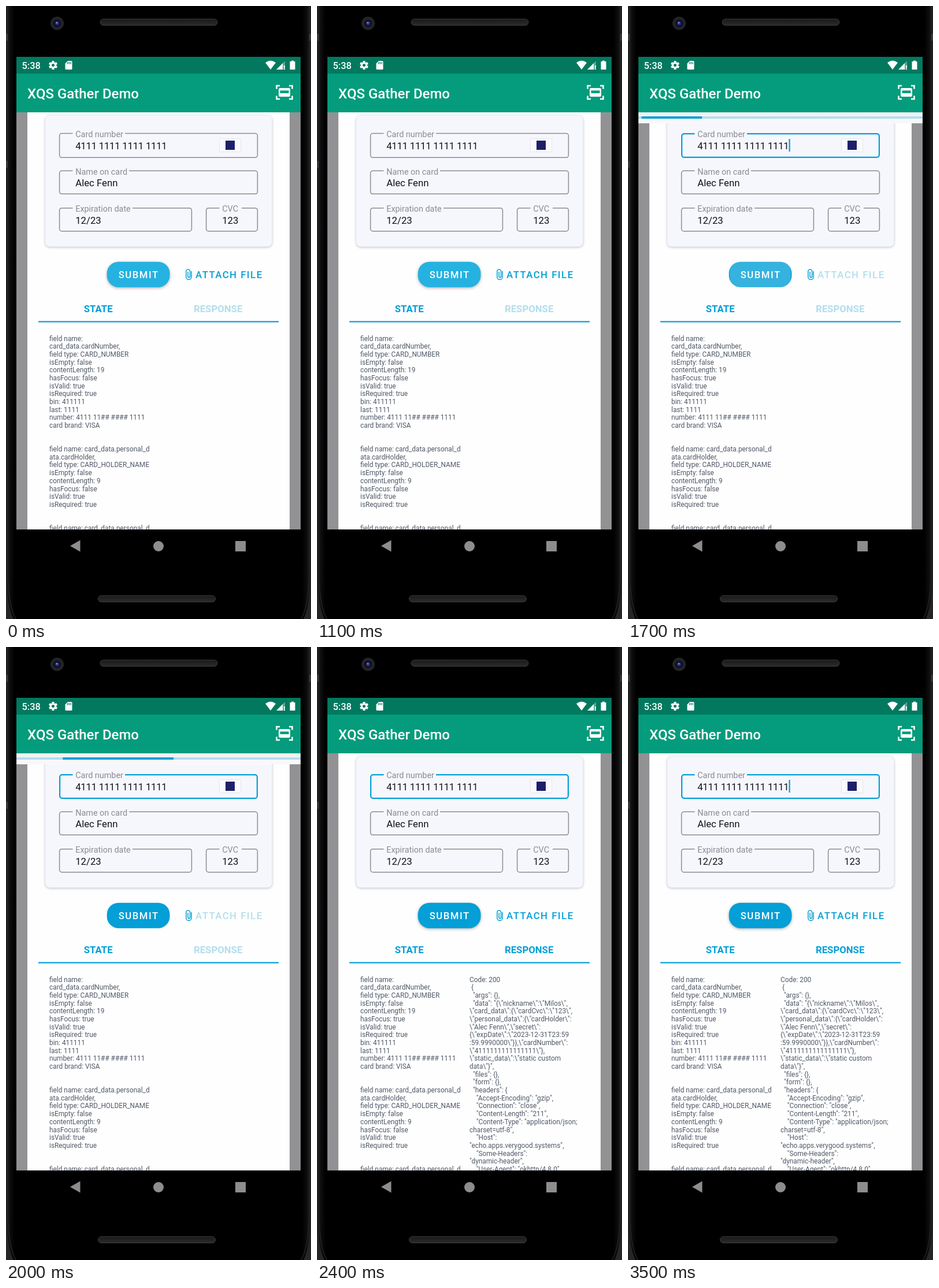
Recreate the animation shown at these times as an HTML page with a canvas. Size 528 by 1061 pixels, loop 3700 ms.

```html
<!DOCTYPE html>
<html lang="en">
<head>
<meta charset="utf-8">
<title>Card form demo</title>
<style>
html, body { margin: 0; width: 100%; height: 100%; overflow: hidden; background: #000; }
canvas { display: block; }
</style>
</head>
<body>
<canvas id="stage" width="528" height="1061"></canvas>
<script>
const ctx = document.getElementById('stage').getContext('2d');
const LOOP = 3700, PRESS = 1400, SEND = 1500, REPLY = 2300;
const BLUE = '#039fd6', PALE = '#b3deec', INK = '#505867';

const STATE = [
  'field name:', 'card_data.cardNumber,', 'field type: CARD_NUMBER', 'isEmpty: false',
  'contentLength: 19', 'hasFocus: false', 'isValid: true', 'isRequired: true',
  'bin: 411111', 'last: 1111', 'number: 4111 11## #### 1111', 'card brand: VISA', '', '',
  'field name: card_data.personal_d', 'ata.cardHolder,', 'field type: CARD_HOLDER_NAME',
  'isEmpty: false', 'contentLength: 9', 'hasFocus: false', 'isValid: true', 'isRequired: true',
  '', '', 'field name: card_data.personal_d'
];
const RESPONSE = String.raw`Code: 200
 {
  "args": {},
  "data": "{\"nickname\":\"Milos\",
\"card_data\":{\"cardCvc\":\"123\",
\"personal_data\":{\"cardHolder\":
\"Alec Fenn\",\"secret\":
{\"expDate\":\"2023-12-31T23:59
:59.9990000\"}},\"cardNumber\":
\"4111111111111111\"},
\"static_data\":\"static custom
data\"}",
  "files": {},
  "form": {},
  "headers": {
    "Accept-Encoding": "gzip",
    "Connection": "close",
    "Content-Length": "211",
    "Content-Type": "application/json;
charset=utf-8",
    "Host":
"echo.apps.verygood.systems",
    "Some-Headers":
"dynamic-header",
    "User-Agent": "okhttp/4.8.0"`.split('\n');

function rect(x, y, w, h, color) {
  ctx.fillStyle = color;
  ctx.fillRect(x, y, w, h);
}

function round(x, y, w, h, r, fill, stroke, width = 1) {
  ctx.beginPath();
  ctx.roundRect(x, y, w, h, r);
  paint(fill, stroke, width);
}

function circle(x, y, r, fill, stroke, width = 1) {
  ctx.beginPath();
  ctx.arc(x, y, r, 0, Math.PI * 2);
  paint(fill, stroke, width);
}

function shape(path, fill, stroke, width = 1) {
  const p = new Path2D(path);
  if (fill) { ctx.fillStyle = fill; ctx.fill(p); }
  if (stroke) { ctx.strokeStyle = stroke; ctx.lineWidth = width; ctx.stroke(p); }
}

function paint(fill, stroke, width) {
  if (fill) { ctx.fillStyle = fill; ctx.fill(); }
  if (stroke) { ctx.strokeStyle = stroke; ctx.lineWidth = width; ctx.stroke(); }
}

function text(str, x, y, size, color, weight = 400, spacing = 0) {
  ctx.font = `${weight} ${size}px Roboto, sans-serif`;
  ctx.letterSpacing = spacing + 'px';
  ctx.fillStyle = color;
  ctx.fillText(str, x, y);
}

function gradient(x0, y0, x1, y1, ...colors) {
  const g = ctx.createLinearGradient(x0, y0, x1, y1);
  colors.forEach((c, i) => g.addColorStop(i / (colors.length - 1), c));
  return g;
}

function withShadow(color, blur, dy, draw) {
  ctx.save();
  ctx.shadowColor = color;
  ctx.shadowBlur = blur;
  ctx.shadowOffsetY = dy;
  draw();
  ctx.restore();
}

function clipped(x, y, w, h, r, draw) {
  ctx.save();
  ctx.beginPath();
  ctx.roundRect(x, y, w, h, r);
  ctx.clip();
  draw();
  ctx.restore();
}

function speaker(x, y) {
  round(x, y, 203, 11, 5.5, gradient(0, y, 0, y + 11, '#1a1a1b', '#2b2b2c'), '#3a3a3b');
}

function phone() {
  rect(0, 0, 528, 1061, '#000');
  rect(0, 0, 15, 1061, gradient(0, 0, 15, 0, '#222223', '#0c0c0d', '#000'));
  rect(513, 0, 15, 1061, gradient(513, 0, 528, 0, '#000', '#0c0c0d', '#222223'));
  shape('M3 0V980Q4 1038 17 1061M525 0V980Q524 1038 511 1061', null, '#242425', 1.5);
  shape('M0 985Q2 1040 13 1061H0ZM528 985Q526 1040 515 1061H528Z', '#262628');
  rect(0, 48, 3, 12, '#39393a');
  rect(0, 268, 3, 12, '#39393a');
  rect(525, 48, 3, 12, '#39393a');
  speaker(163, 22.5);
  speaker(159.5, 1020.5);
  circle(88.5, 30, 11, '#232325', '#2c2c2f');
  circle(88.5, 30, 6.5, '#0e0f24');
  circle(88.5, 30, 3.5, '#252b80');
  circle(88, 29, 1.6, '#7d84cf');
  shape('M111 934.5L128.5 924.5V944.5Z', '#8e8c8f');
  circle(264, 935, 9, '#8e8c8f');
  rect(397, 926, 18, 18, '#8e8c8f');
}

function statusIcons() {
  for (let i = 0; i < 6; i++) {
    ctx.save();
    ctx.translate(81.5, 102.5);
    ctx.rotate(i * Math.PI / 3);
    rect(-2, -7.5, 4, 4, '#fff');
    ctx.restore();
  }
  circle(81.5, 102.5, 4.1, null, '#fff', 3.2);
  shape('M107 95H113Q114.5 95 114.5 96.5V108.5Q114.5 110 113 110H104Q102.5 110 102.5 108.5V99.5Z', '#fff');
  for (const x of [106, 108.7, 111.4]) rect(x, 97, 1.3, 3.5, '#02795f');
  shape('M449 98Q458 91 467 98L458 110Z', '#fff');
  shape('M483 95V110H468Z', 'rgba(255,255,255,.35)');
  shape('M479 99V110H468ZM481 103H483V107H481ZM481 108H483V110H481Z', '#fff');
  shape('M494 94.5H498V96H500.5V110H491.5V96H494Z', '#fff');
}

function header() {
  rect(18, 88, 492, 29, '#02795f');
  rect(18, 117, 492, 67, '#049c7c');
  text('5:38', 27.5, 108.7, 16.4, '#fff', 500);
  statusIcons();
  text('XQS Gather Demo', 37, 159.5, 24, '#fff', 500);
  shape('M474 138H468.5V143.5M490 138H495.5V143.5M474 161H468.5V155.5M490 161H495.5V155.5', null, '#fff', 2.6);
  round(472, 142, 20, 15, 2.5, '#fff');
  rect(474.5, 146.3, 15, 4.6, '#049c7c');
}

function field(x, y, w, h, notch, label, value, { focused = false, spacing = 0 } = {}) {
  const [left, right] = notch, labelX = left + 4.7;
  const inset = focused ? .5 : 0;
  ctx.save();
  ctx.beginPath();
  ctx.rect(0, y + 4, 528, h + 8);
  ctx.rect(0, y - 6, left, 10);
  ctx.rect(right, y - 6, 528 - right, 10);
  ctx.clip();
  round(x + inset, y + inset, w - 2 * inset, h - 2 * inset, 4, null,
    focused ? BLUE : '#8b8b8f', focused ? 2.2 : 1.5);
  ctx.restore();
  text(label, labelX, y + 6.3, 14.4, '#8b8b91');
  text(value, labelX, y + 26.9, 16.76, '#111114', 400, spacing);
}

function card(focused, cursor) {
  withShadow('rgba(70,80,110,.38)', 4, 1, () => round(68, 189.5, 392.5, 227, 8, '#f6f7fd'));
  field(92.6, 220.6, 342.8, 41.7, [115.5, 206], 'Card number', '4111 1111 1111 1111', { focused, spacing: -.25 });
  field(92.6, 285.3, 342.8, 40, [115.5, 213], 'Name on card', 'Alec Fenn');
  field(92.6, 349.7, 228.8, 40, [115.5, 219], 'Expiration date', '12/23');
  field(346.6, 349.7, 88.8, 40, [369.5, 408], 'CVC', '123');
  round(369.5, 229.5, 37, 23, 1, '#fafafe', '#e5e6eb');
  rect(380, 233, 16, 16, '#1d2069');
  if (cursor) rect(278.5, 230, 2.2, 22, BLUE);
}

function submitButton(t) {
  const box = [174.7, 442.7, 108.8, 44, 20];
  const body = () => round(...box, t < SEND ? '#25b2e0' : BLUE);
  if (t >= SEND && t < REPLY) body();
  else withShadow('rgba(0,0,0,.3)', 5, 1.5, body);
  if (t >= PRESS && t < 1900) {
    const radius = t < SEND ? 34 : 53;
    const alpha = t < SEND ? .25 : .4 * (1900 - t) / 400;
    clipped(...box, () => circle(229, 465, radius, `rgba(255,255,255,${alpha})`));
  }
  text('SUBMIT', 194.7, 471, 16.76, '#fff', 500, 1.5);
}

function buttons(t, loading) {
  submitButton(t);
  shape('M321 459V469A4.6 4.6 0 0 1 311.8 469V459.5A3.2 3.2 0 0 1 318.6 459.5V468A1.8 1.8 0 0 1 315 468V460', null, BLUE, 1.5);
  text('ATTACH FILE', 328, 471, 16.76, loading ? PALE : BLUE, 500, 1.5);
}

function lines(list, x) {
  list.forEach((line, i) => text(line, x, 579.6 + i * 13.68, 11.85, INK));
}

function progress(t) {
  rect(18, 184, 492, 19, gradient(0, 184, 0, 203, '#ececef', '#f8f8fa', '#f8f8fa'));
  rect(18, 191, 492, 4, '#b0deee');
  const p = (t - SEND) / 500;
  const tail = -.09 + .253 * p, head = .004 + .549 * p;
  clipped(18, 184, 492, 19, 0, () => rect(18 + 492 * tail, 191, 492 * (head - tail), 4, BLUE));
}

function page(t) {
  const focused = t >= SEND, loading = focused && t < REPLY, replied = t >= REPLY;
  const cursor = focused && Math.floor((t - SEND) / 500) % 2 === 0;
  rect(18, 184, 492, 722, '#929194');
  rect(37, 184, 454, 722, '#fefefe');
  card(focused, cursor);
  buttons(t, loading);
  text('STATE', 134.8, 530.4, 16.76, BLUE, 700);
  text('RESPONSE', 325, 530.4, 16.76, replied ? BLUE : PALE, 700);
  rect(56, 545.3, 416, 2.2, BLUE);
  lines(STATE.map((s, i) => focused && i === 5 ? 'hasFocus: true' : s), 75);
  if (replied) lines(RESPONSE, 264);
  if (loading) progress(t);
}

function frame(now) {
  const t = Math.floor((now % LOOP) / 100) * 100;
  phone();
  clipped(18, 184, 492, 722, 0, () => page(t));
  header();
  requestAnimationFrame(frame);
}

frame(performance.now());
</script>
</body>
</html>
```
